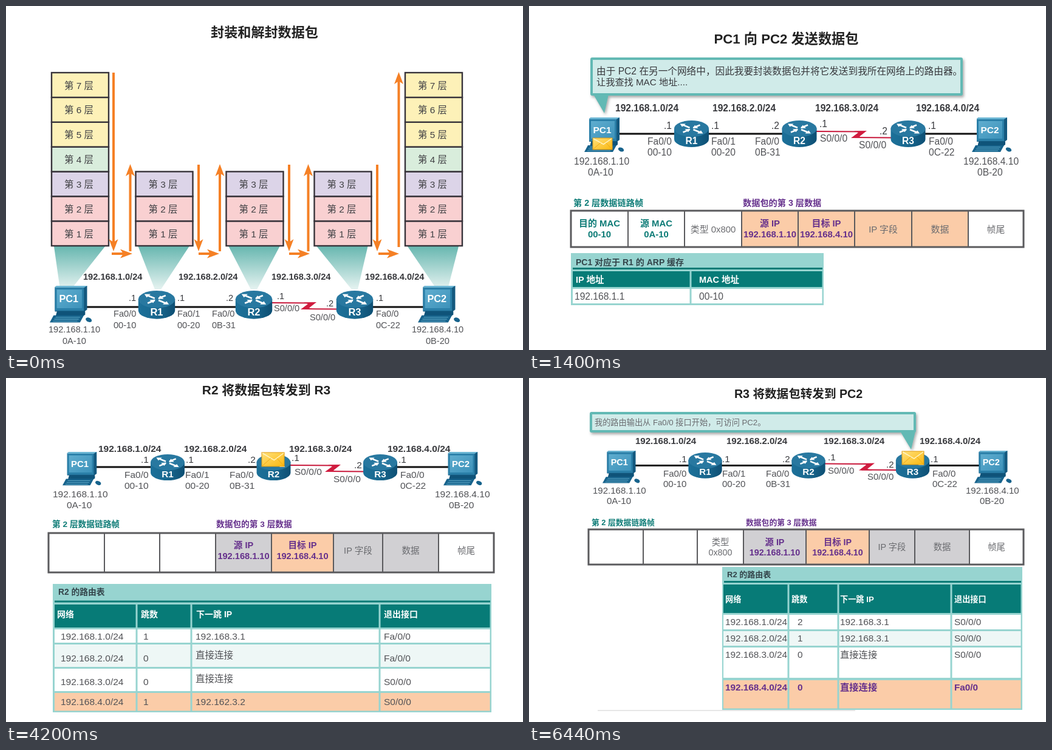
Write an HTML page that moves like this. It is 851 px wide and 568 px high and loops after 7 s.

```html
<!DOCTYPE html>
<html lang="zh-CN">
<head>
<meta charset="utf-8">
<title>数据包转发</title>
<style>
  html, body { margin: 0; width: 100%; height: 100%; overflow: hidden; background: #fff; }
  svg { display: block; width: 851px; height: 568px; }
  text { font-family: "Liberation Sans", "Noto Sans CJK SC", "Noto Sans CJK", sans-serif; white-space: pre; }
</style>
</head>
<body>
<svg id="stage" viewBox="0 0 851 568">
  <defs>
    <linearGradient id="beam" x2="0" y2="1"><stop stop-color="#68b7b0"/><stop offset="1" stop-color="#e6f3f1"/></linearGradient>
    <linearGradient id="mail" x2="1" y2="1"><stop stop-color="#ffe07a"/><stop offset="1" stop-color="#fbb80f"/></linearGradient>
    <linearGradient id="side"><stop stop-color="#1c7099"/><stop offset=".5" stop-color="#19688f"/><stop offset="1" stop-color="#0d4f74"/></linearGradient>
    <linearGradient id="screen" x2="1" y2="1"><stop stop-color="#5fadcf"/><stop offset="1" stop-color="#3d92ba"/></linearGradient>
    <filter id="shadow" x="-5%" y="-20%" width="110%" height="150%">
      <feDropShadow dx="2" dy="3" stdDeviation="2" flood-color="#555" flood-opacity=".5"/>
    </filter>
  </defs>
</svg>
<script>
const SLIDE_MS = 1400;
const TEAL = '#0c7b76', AQUA = '#97d4d0', PURPLE = '#65308c', ORANGE = '#fbcca8';
const SILVER = '#d1d0d3', GRAY = '#515256', DARK = '#38393d', MUTED = '#6a6b6f', PALE = '#eef7f6', FLAME = '#f58025';
const stage = document.getElementById('stage');
const slides = [];
let layer;

function add(tag, attrs, parent = layer) {
  const el = document.createElementNS('http://www.w3.org/2000/svg', tag);
  for (const k in attrs) el.setAttribute(k, attrs[k]);
  return parent.appendChild(el);
}
const box = (x0, y0, x1, y1, fill, more = {}) =>
  add('rect', { x: x0, y: y0, width: x1 - x0, height: y1 - y0, fill, ...more });
const line = (d, stroke, width, parent = layer) =>
  add('path', { d, stroke, 'stroke-width': width, fill: 'none' }, parent);
const shape = (d, fill, parent = layer) => add('path', { d, fill }, parent);

function text(str, x, y, size, fill = GRAY, bold = false, anchor = 'start', parent = layer) {
  add('text', { x, y, fill, 'font-size': size, 'font-weight': bold ? 700 : 400, 'text-anchor': anchor }, parent)
    .textContent = str;
}

function slide(title, x, y, size) {
  layer = add('g', { display: 'none' }, stage);
  slides.push(layer);
  text(title, x, y, size, '#222', true, 'middle');
}

function router(name, cx, top, s) {
  const g = add('g', { transform: `translate(${cx} ${top}) scale(${s})` });
  shape('M-28.5 13V31A28.5 13 0 0 0 28.5 31V13Z', 'url(#side)', g);
  add('ellipse', { cy: 13.5, rx: 28.5, ry: 13.5, fill: '#2878a0' }, g);
  for (const sx of [-1, 1]) for (const sy of [-1, 1]) {
    const arm = add('g', { transform: `translate(0 13.5) scale(${sx} ${sy})` }, g);
    line('M3 1.5L14 6', '#fff', 2.6, arm);
    shape(sx * sy > 0 ? 'M19 8L9.5 8L15.5 3Z' : 'M2 .5L11 .8L5.5 5.8Z', '#fff', arm);
  }
  text(name, 0, 38.5, 15.6, '#fff', true, 'middle', g);
}

function pc(name, x, y, s) {
  const g = add('g', { transform: `translate(${x} ${y}) scale(${s})` });
  shape('M12 37H51L55 40V45L50 48H9Z', '#0f5379', g);
  shape('M6 46H53L47 57H0Z', '#17638c', g);
  line('M9 49H47M7 52H45M5 55H43', '#5fa9c8', 1, g);
  shape('M8 2L11 0H58V37L54 40H8Z', '#14597f', g);
  shape('M8 2L11 0H58L53 3H8Z', '#6db6d4', g);
  shape('M8 3H53V39H8Z', '#2a7fa8', g);
  shape('M11 6H50V35H11Z', 'url(#screen)', g);
  add('ellipse', { cx: 60.5, cy: 53, rx: 5, ry: 3.2, fill: '#17638c', transform: 'rotate(25 60.5 53)' }, g);
  text(name, 29.5, 25.5, 15.4, '#fff', true, 'middle', g);
}

const PORTS = ['Fa0/0|00-10', 'Fa0/1|00-20', 'Fa0/0|0B-31', 'S0/0/0', 'S0/0/0', 'Fa0/0|0C-22'];
const DOTS = ['.1', '.1', '.2', '.1', '.2', '.1'];
const DOT_DROP = [0, 0, 0, -3, 9, 0];
const HOSTS = ['192.168.1.10|0A-10', '192.168.4.10|0B-20'];

function network(o) {
  const { size, wire, bolt, routers, pcs, scale, step = 18 } = o;
  const [bx, by] = bolt, reach = 28 * scale;
  line(`M${pcs[0] + 50} ${wire}H${routers[1]}M${routers[2]} ${wire}H${pcs[1] + 15}`, '#111', 3);
  line(`M${routers[1] + reach - 2} ${by - 5}L${bx + 9} ${by - 4.5}M${bx - 9} ${by + 5}L${routers[2] - reach + 2} ${by + 5.5}`, '#c8193c', 2);
  shape(`M${bx + 13} ${by - 6}L${bx + 1} ${by + 3.5}L${bx + 9} ${by + 6}L${bx - 13} ${by + 6}L${bx - 1} ${by - 3}L${bx - 8} ${by - 5.5}Z`, '#d01c3f');
  routers.forEach((x, i) => router('R' + (i + 1), x, o.top, scale));
  pcs.forEach((x, i) => pc('PC' + (i + 1), x, o.pcTop, o.pcScale));
  o.nets.forEach((x, i) => text(`192.168.${i + 1}.0/24`, x, o.netY, size, DARK, true));
  DOTS.forEach((s, i) => text(s, o.dots[i], o.dotY + DOT_DROP[i], size, DARK, o.hot && i === 2));
  PORTS.forEach((s, i) => {
    const y = i === 3 ? o.serial[0] : i === 4 ? o.serial[1] : o.portY;
    s.split('|').forEach((row, k) => text(row, o.ports[i], y + k * step, size));
  });
  HOSTS.forEach((s, i) => s.split('|').forEach((row, k) =>
    text(row, o.hosts[i] + k * 23, o.hostY + k * step, size)));
}

function mail(x, y, w, h) {
  box(x, y, x + w, y + h, 'url(#mail)', { stroke: '#e09a10', 'stroke-width': 1 });
  line(`M${x + 1} ${y + 1}L${x + w * .55} ${y + h * .55}L${x + w - 1} ${y + 1}`, '#fff3c4', 1.5);
  line(`M${x + 1} ${y + h - 1}L${x + w * .4} ${y + h * .42}M${x + w - 1} ${y + h - 1}L${x + w * .68} ${y + h * .42}`, '#eda91a', 1);
}

function callout(x0, y0, x1, y1, tailL, tailR, tipX, tipY) {
  const g = add('g', { filter: 'url(#shadow)' });
  shape(`M${tailL} ${y1 - 2}H${tailR}L${tipX} ${tipY}Z`, '#62b9b4', g);
  add('rect', { x: x0 + 2, y: y0 + 2, width: x1 - x0 - 4, height: y1 - y0 - 4, rx: 1,
    fill: '#d0ebe9', stroke: '#62b9b4', 'stroke-width': 4 }, g);
}

const FIELD_FILL = { w: '#fff', o: ORANGE, g: SILVER };

function fields(edges, y0, y1, fills, labels, size, single, first, second) {
  const last = edges.length - 1;
  for (let i = 0; i < last; i++) {
    const x0 = edges[i], x1 = edges[i + 1], mid = (x0 + x1) / 2;
    box(x0, y0, x1, y1, FIELD_FILL[fills[i]]);
    const color = i < 2 ? TEAL : i === 3 || i === 4 ? PURPLE : MUTED;
    const rows = labels[i].split('|');
    rows.forEach((s, k) => text(s, mid, rows.length < 2 ? single : k ? second : first, size, color, color !== MUTED, 'middle'));
  }
  line(edges.slice(1, last).map(x => `M${x} ${y0}V${y1}`).join(''), '#5a5a5d', 2);
  box(edges[0], y0, edges[last], y1, 'none', { stroke: '#5a5a5d', 'stroke-width': 3 });
}

function captions(x0, x1, y, size) {
  text('第 2 层数据链路帧', x0, y, size, TEAL, true);
  text('数据包的第 3 层数据', x1, y, size, PURPLE, true);
}

// Each row: [top, bottom, baseline, fill, cells, color]; hotCell marks one cell of the last row.
function table(o) {
  const { area, cols, head, names, rows, size, hotCell = -1, lift = 0 } = o;
  const [x0, y0, x1] = area;
  const cell = (i, top, bottom, fill) => box(cols[i] + (i ? 1.5 : 0), top, cols[i + 1] - 1.5, bottom, fill);
  box(...area, AQUA);
  text(o.title, o.titleX, o.titleY, o.titleSize || 14, '#33444a', true);
  box(x0 + 3, o.bar - 1.5, x1 - 2, o.bar + 1.5, TEAL);
  names.forEach((s, i) => {
    cell(i, head[0], head[1], '#077b77');
    text(s, o.headX[i], head[2], o.headSize || 14, '#fff', true);
  });
  rows.forEach(([top, bottom, base, fill, cells, color], r) => cells.forEach((s, i) => {
    const hot = r === rows.length - 1 && i === hotCell;
    cell(i, top, bottom, hot ? ORANGE : fill);
    const ink = hot ? PURPLE : color;
    text(s, o.cellX[i], s === DIRECT ? base - lift : base, size, ink || GRAY, !!ink);
  }));
}

const ROUTE_NAMES = ['网络', '跳数', '下一跳 IP', '退出接口'];
const route = (n, hops, next, port) => [`192.168.${n}.0/24`, String(hops), next, port];
const DIRECT = '直接连接';

// Layer stacks
slide('封装和解封数据包', 425.5, 51, 22.1);
const layerFill = n => n > 4 ? '#fdf1b8' : n > 3 ? '#d9eddc' : n > 2 ? '#dcd4e8' : '#f9d0d1';

function stack(x, levels, tip, spread) {
  shape(`M${x + 4} 397H${x + 88}L${tip + spread} 468H${tip - spread}Z`, 'url(#beam)');
  for (let n = 1; n <= levels; n++) {
    const y = 396 - n * 40.85;
    box(x, y, x + 94, y + 40.85, layerFill(n), { stroke: '#37333a', 'stroke-width': 2.4 });
    text(`第 ${n} 层`, x + 45, y + 26.5, 15.4, '#404044', false, 'middle');
  }
}
function arrow(x0, y0, x1, y1) {
  const len = Math.hypot(x1 - x0, y1 - y0), turn = Math.atan2(y1 - y0, x1 - x0) * 180 / Math.PI;
  const g = add('g', { transform: `translate(${x0} ${y0}) rotate(${turn})` });
  line(`M0 0H${len - 14}`, FLAME, 4, g);
  shape(`M${len} 0L${len - 20} -7.5L${len - 15} 0L${len - 20} 7.5Z`, FLAME, g);
}
stack(75, 7, 98, 9);
stack(213.5, 3, 250, 5);
stack(362.5, 3, 408, 5);
stack(507.5, 3, 574, 5);
stack(657, 7, 718, 9);
arrow(177, 110, 177, 405);
[204.5, 352, 497.5].forEach(x => arrow(x, 405, x, 261));
[317, 466, 611].forEach(x => arrow(x, 262, x, 405));
[174, 317, 466, 613].forEach(x => arrow(x, 409, x + 34, 409));
arrow(646.5, 398, 646.5, 109);
network({
  size: 14.6, wire: 497, bolt: [498, 495], routers: [248, 408, 574], top: 470, scale: 1.06,
  pcs: [72, 678], pcTop: 462, pcScale: 1.06, step: 19,
  nets: [127, 284, 437, 591], netY: 452, dots: [202, 282, 362, 446, 527, 609], dotY: 487,
  ports: [177, 282, 339, 441, 500, 609], portY: 513, serial: [504, 519], hosts: [70, 668], hostY: 539
});

// First hop
slide('PC1 向 PC2 发送数据包', 423.5, 62, 22.2);
callout(101, 85, 714, 148, 106, 131, 124, 177);
text('由于 PC2 在另一个网络中，因此我要封装数据包并将它发送到我所在网络上的路由器。', 111, 113, 15.65, DARK);
text('让我查找 MAC 地址....', 111, 131, 15.2, DARK);
network({
  size: 15.6, wire: 211, bolt: [543, 212], routers: [267.5, 445, 624], top: 189, scale: 1,
  pcs: [91, 729], pcTop: 184, pcScale: 1,
  nets: [142, 302, 471, 637], netY: 174, dots: [222, 300, 399, 478, 577, 657], dotY: 203,
  ports: [195, 300, 372, 479, 543, 658], portY: 229, serial: [224, 235], hosts: [74, 715], hostY: 262
});
mail(105, 218, 32, 19);
captions(73, 352, 330, 14.2);
fields([69, 163, 256, 350, 443, 536, 630, 723, 814], 338, 398, 'wwwoooow',
  ['目的 MAC|00-10', '源 MAC|0A-10', '类型 0x800', '源 IP|192.168.1.10', '目标 IP|192.168.4.10', 'IP 字段', '数据', '帧尾'],
  14.9, 374, 364, 382);
table({
  area: [69, 408, 485, 494], title: 'PC1 对应于 R1 的 ARP 缓存', titleX: 77, titleY: 428, bar: 433.5,
  cols: [72, 266, 484], head: [438, 464, 457], names: ['IP 地址', 'MAC 地址'], headX: [77, 280], headSize: 14.5,
  cellX: [75, 280], size: 15.6, rows: [[467, 491, 485, '#fff', ['192.168.1.1', '00-10']]]
});

// Forwarding by R1
slide('R1 将数据包转发到 PC2', 431.5, 41, 20.7);
callout(235, 92, 788, 130, 239, 264, 260, 159);
text('我的 ARP 表告知我：PC2 使用的是 MAC 地址 OB-31。', 246, 116, 16.6);
box(388, 169, 408, 187, ORANGE);
box(358, 211, 407, 230, ORANGE);
network({
  size: 15.15, wire: 189.5, bolt: [530, 190.5], routers: [263, 434.5, 608], top: 168, scale: .96,
  pcs: [93, 710], pcTop: 165, pcScale: .95,
  nets: [146, 297, 460, 619], netY: 155, dots: [221, 293, 392, 464, 565, 637], dotY: 183, hot: true,
  ports: [194, 292, 363, 470, 532, 640], portY: 207, serial: [202, 214], hosts: [76, 696], hostY: 239
});
mail(245, 170, 35, 22);
captions(70, 345, 286, 13.6);
fields([70, 160, 251, 341, 432, 521, 611, 702, 791], 293, 365, 'owwgoggw',
  ['目的 MAC|0B-31', '', '类型 0x800', '源 IP|192.168.1.10', '目标 IP|192.168.4.10', 'IP 字段', '数据', '帧尾'],
  14.4, 334, 328, 344);
table({
  area: [76, 372, 282, 456], title: 'R1 的 ARP 缓存', titleX: 81, titleY: 390, titleSize: 13.6, bar: 397,
  cols: [79, 175, 281], head: [403, 425, 420], names: ['IP 地址', 'MAC 地址'], headX: [83, 180],
  cellX: [83, 186], size: 14.9, rows: [[429, 453, 446, ORANGE, ['192.168.2.2', '0B-31'], TEAL]]
});
table({
  area: [310, 372, 789, 557], title: 'R1 的路由表', titleX: 318, titleY: 390, titleSize: 13.8, bar: 401,
  cols: [313, 422, 484, 661, 788], head: [408, 443, 431], names: ROUTE_NAMES, headX: [316, 427, 488, 665], headSize: 13.6,
  cellX: [316, 435, 487, 664], size: 15.2, hotCell: 2,
  rows: [
    [446, 472, 464, PALE, route(1, 0, DIRECT, 'Fa0/0')],
    [475, 501, 493, '#fff', route(2, 0, DIRECT, 'Fa0/1')],
    [504, 529, 522, PALE, route(3, 1, '192.168.2.2', 'Fa0/1')],
    [532, 557, 550, '#fff', route(4, 2, '192.168.2.2', 'Fa0/1')]
  ]
});

// Forwarding by R2
slide('R2 将数据包转发到 R3', 428.5, 27, 20.9);
network({
  size: 15.5, wire: 147, bolt: [538, 149], routers: [266, 440.5, 616], top: 126, scale: .98,
  pcs: [93, 720], pcTop: 122, pcScale: .97,
  nets: [152, 293, 466, 628], netY: 122, dots: [222, 296, 398, 470, 573, 646], dotY: 140,
  ports: [195, 295, 368, 475, 539, 649], portY: 165, serial: [160, 172], hosts: [77, 706], hostY: 197
});
mail(421, 123, 37, 23);
captions(76, 346, 246, 13.7);
fields([70, 162, 253, 345, 437, 539, 620, 712, 803], 256, 321, 'wwwgoggw',
  ['', '', '', '源 IP|192.168.1.10', '目标 IP|192.168.4.10', 'IP 字段', '数据', '帧尾'],
  14.6, 290, 281, 299);
table({
  area: [77, 340, 799, 552], title: 'R2 的路由表', titleX: 86, titleY: 358, titleSize: 13.8, bar: 369,
  cols: [80, 215, 305, 615, 798], head: [374, 412, 395], names: ROUTE_NAMES, headX: [84, 222, 313, 622],
  cellX: [90, 226, 312, 622], size: 15.5, lift: 5,
  rows: [
    [415, 437, 431.5, '#fff', route(1, 1, '192.168.3.1', 'Fa/0/0')],
    [440, 477, 468, PALE, route(2, 0, DIRECT, 'Fa/0/0')],
    [480, 517, 507, '#fff', route(3, 0, DIRECT, 'S0/0/0')],
    [520, 549.5, 540, ORANGE, route(4, 1, '192.162.3.2', 'S0/0/0')]
  ]
});

// Forwarding by R3
slide('R3 将数据包转发到 PC2', 443.5, 33, 19.6);
callout(100, 56, 637, 90, 611, 636, 629, 118);
text('我的路由输出从 Fa0/0 接口开始，可访问 PC2。', 108, 78, 13.2, MUTED);
network({
  size: 15, wire: 144.5, bolt: [556, 146.5], routers: [290, 460, 631.5], top: 123, scale: .97,
  pcs: [121, 733], pcTop: 120, pcScale: .94, step: 17.3,
  nets: [175, 325, 485, 643], netY: 109, dots: [247, 318, 417, 492, 588, 661], dotY: 139,
  ports: [221, 318, 390, 492, 557, 664], portY: 163, serial: [158, 168], hosts: [105, 719], hostY: 190.5
});
mail(614, 121, 36, 22);
captions(103, 357, 243, 12.8);
fields([98, 188, 277, 353, 456, 560, 635, 725, 814], 250, 308, 'wwwgoggw',
  ['', '', '类型|0x800', '源 IP|192.168.1.10', '目标 IP|192.168.4.10', 'IP 字段', '数据', '帧尾'],
  14.3, 284, 276, 293);
line('M113 549H537', '#cfcfcf', 1);
table({
  area: [318, 312, 812, 548], title: 'R2 的路由表', titleX: 326, titleY: 329, titleSize: 13, bar: 336.5,
  cols: [320, 427, 509, 695, 811], head: [341, 388, 370], names: ROUTE_NAMES, headX: [323, 432, 512, 700], headSize: 13.2,
  cellX: [323, 442, 512, 700], size: 15.3,
  rows: [
    [391, 415, 408, '#fff', route(1, 2, '192.168.3.1', 'S0/0/0')],
    [418, 442, 435, PALE, route(2, 1, '192.168.3.1', 'S0/0/0')],
    [445, 495, 462, '#fff', route(3, 0, DIRECT, 'S0/0/0')],
    [499, 545.5, 515.5, ORANGE, route(4, 0, DIRECT, 'Fa0/0'), PURPLE]
  ]
});

let shown = -1;
function tick() {
  const now = Math.floor(performance.now() / SLIDE_MS) % slides.length;
  if (now !== shown) {
    slides.forEach((g, i) => g.setAttribute('display', i === now ? 'inline' : 'none'));
    shown = now;
  }
  requestAnimationFrame(tick);
}
tick();
</script>
</body>
</html>
```
